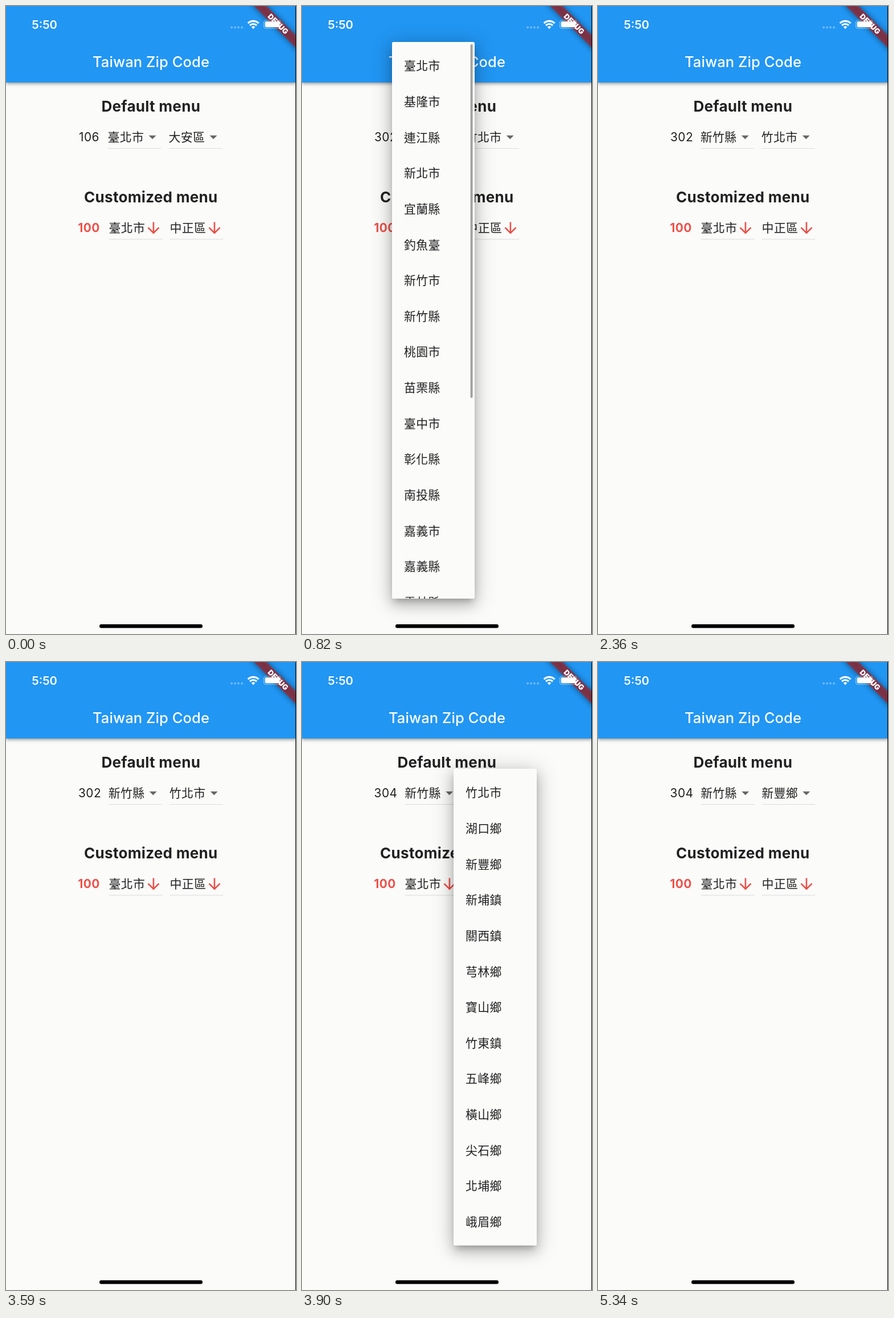
Animation of 509 by 1100 pixels, one loop 6260 ms. Source, as an HTML page:

```html
<!DOCTYPE html>
<html lang="zh-Hant">
<head>
<meta charset="utf-8">
<title>Taiwan Zip Code</title>
<style>
  html, body { margin: 0; width: 100%; height: 100%; overflow: hidden; background: #fbfbfa; }
  #stage { position: relative; width: 509px; height: 1100px; overflow: hidden; background: #fbfbfa; }
  #bar {
    position: absolute; left: 0; top: 0; width: 509px; height: 134px; background: #2196f3;
    box-shadow: 0 2px 5px rgba(0,0,0,.32), 0 1px 9px rgba(0,0,0,.16);
  }
  svg { position: absolute; left: 0; top: 0; overflow: visible; }
  text { font-family: Inter, "Open Sans", sans-serif; font-optical-sizing: none; fill: #212121; white-space: pre; }
  .mid { text-anchor: middle; }
  .title { font-size: 25.5px; font-weight: 500; letter-spacing: .1px; fill: #fff; }
  .head { font-size: 26px; font-weight: 700; letter-spacing: .3px; }
  .zip { font-size: 20.8px; letter-spacing: .5px; }
  .cjk { font-family: "Noto Sans CJK TC", "Noto Sans CJK JP", "Noto Sans CJK", sans-serif; font-size: 20.9px; letter-spacing: .3px; }
  .red { fill: #eb5149; }
  .line { fill: #dcdcdc; }
  .menu, .panel, .list { position: absolute; }
  .panel {
    left: 0; width: 100%; border-radius: 2.6px; background: #fbfbfa;
    box-shadow: 0 6.5px 10px -4px rgba(0,0,0,.2), 0 10.4px 20px 1.3px rgba(0,0,0,.15), 0 5px 36px 4px rgba(0,0,0,.19);
  }
  .list { inset: 0; overflow: hidden; border-radius: 2.6px; }
</style>
</head>
<body>
<div id="stage">
  <div id="bar"></div>
  <svg width="509" height="1100">
    <text class="mid title" x="254.5" y="106.6">Taiwan Zip Code</text>
    <text class="mid head" x="254.3" y="185">Default menu</text>
    <text class="mid head" x="254.3" y="344">Customized menu</text>
    <g id="rows"></g>
  </svg>
  <div id="menus"></div>
  <svg width="509" height="1100">
    <defs>
      <filter id="soft" x="-30%" y="-150%" width="160%" height="400%"><feGaussianBlur stdDeviation="5.2"/></filter>
    </defs>
    <g transform="translate(509 0) rotate(45)">
      <rect x="-60" y="36.5" width="120" height="15.7" opacity=".5" filter="url(#soft)"/>
      <rect x="-60" y="36.5" width="120" height="15.7" fill="#b71c1c" fill-opacity=".627"/>
      <text class="mid" x="0" y="49" style="font-size:12.8px;font-weight:900;fill:#fff">DEBUG</text>
    </g>
    <text x="45.3" y="40" style="font-size:20.3px;font-weight:600;fill:#fff">5:50</text>
    <g fill="#fff">
      <g opacity=".35">
        <circle cx="396" cy="37.5" r="1.9"/><circle cx="402" cy="37.5" r="1.9"/>
        <circle cx="408" cy="37.5" r="1.9"/><circle cx="414" cy="37.5" r="1.9"/>
      </g>
      <g fill="none" stroke="#fff" stroke-width="3.2">
        <path d="M424.6 30.2a13.4 13.4 0 0 1 18.8 0"/>
        <path d="M428 34a8.5 8.5 0 0 1 12 0"/>
      </g>
      <path d="M434 40.2l-3.3-3.4a4.8 4.8 0 0 1 6.6 0z"/>
      <rect x="452.5" y="24.8" width="30" height="14.6" rx="4.2" fill="none" stroke="#fff" stroke-opacity=".4" stroke-width="1.3"/>
      <rect x="454.6" y="26.9" width="25.8" height="10.4" rx="2.4"/>
      <path d="M484.5 29.8q2 .7 2 2.4t-2 2.4z" opacity=".4"/>
    </g>
    <rect x="164" y="1083" width="181" height="6.6" rx="3.3"/>
    <rect x="508" y="0" width="1" height="1100"/>
  </svg>
</div>
<script>
const LOOP = 6260, ITEM = 62.64, PAD = 10.44;
const STEPS = [0, 110, 210, 310];
const $ = id => document.getElementById(id);
const clamp = v => Math.max(0, Math.min(1, v));

const values = [
  { from: 0, zip: '106', zipX: 128, x: 178.6, city: '臺北市', area: '大安區' },
  { from: 820, zip: '302', zipX: 127, x: 179.8, city: '新竹縣', area: '竹北市' },
  { from: 3900, zip: '304', zipX: 126.6, x: 180.3, city: '新竹縣', area: '新豐鄉' }
];

const menus = [
  {
    open: 510, close: 2050, x: 157.7, y: 62.5, w: 145.8, h: 975, total: 24, ink: 7, bar: true,
    names: '臺北市 基隆市 連江縣 新北市 宜蘭縣 釣魚臺 新竹市 新竹縣 桃園市 苗栗縣 臺中市 彰化縣 南投縣 嘉義市 嘉義縣 雲林縣'
  },
  {
    open: 3590, close: 5030, x: 265.8, y: 187, w: 145.8, h: 835.2, total: 13, ink: 2,
    names: '竹北市 湖口鄉 新豐鄉 新埔鎮 關西鎮 芎林鄉 寶山鄉 竹東鎮 五峰鄉 橫山鄉 尖石鄉 北埔鄉 峨眉鄉'
  }
];

const triangle = (x, y) => `<path d="M${x - 6.5} ${y - 3.2}h13l-6.5 6.5z" fill="#666"/>`;
const arrow = (x, y) => `<path class="red" transform="translate(${x - 15.66} ${y - 15.66}) scale(1.305)"
  d="M20 12l-1.41-1.41L13 16.17V4h-2v12.17l-5.58-5.59L4 12l8 8 8-8z"/>`;

function field(x, y, name, icon) {
  return `<text class="cjk" x="${x}" y="${y + 6.9}">${name}</text>
    <rect class="line" x="${x + .4}" y="${y + 19}" width="93.5" height="1"/>${icon(x + 78.4, y)}`;
}

function row(v, y, icon, zipStyle = '') {
  return `<text class="zip" ${zipStyle} x="${v.zipX}" y="${y + 7.4}">${v.zip}</text>`
    + field(v.x, y, v.city, icon) + field(v.x + 107, y, v.area, icon);
}

const custom = { zip: '100', zipX: 126.2, x: 180.5, city: '臺北市', area: '中正區' };
$('rows').innerHTML = values.map(v => `<g class="value">${row(v, 230, triangle)}</g>`).join('')
  + row(custom, 389, arrow, 'style="font-weight:700;fill:#eb5149"');

$('menus').innerHTML = menus.map((m, k) => {
  const items = m.names.split(' ').map((name, i) =>
    `<text class="cjk item" x="21" y="${PAD + ITEM * (i + .5) + 7.6}">${name}</text>`).join('');
  const inkTop = PAD + ITEM * m.ink;
  return `<div class="menu" style="left:${m.x}px;top:${m.y}px;width:${m.w}px;height:${m.h}px">
    <div class="panel"></div>
    <div class="list"><svg width="${m.w}" height="${m.h}">
      <clipPath id="row${k}"><rect y="${inkTop}" width="${m.w}" height="${ITEM}"/></clipPath>
      <circle class="ink" clip-path="url(#row${k})" cx="74.2" cy="${inkTop + 37}" r="43" fill-opacity=".075"/>
      ${items}
      ${m.bar ? '<rect class="thumb" x="137.6" y="4" width="4" height="619.5" rx="2" fill-opacity=".36"/>' : ''}
    </svg></div></div>`;
}).join('');

const valueNodes = [...document.querySelectorAll('.value')];
document.querySelectorAll('.menu').forEach((node, k) => {
  const m = menus[k];
  m.node = node;
  m.panel = node.querySelector('.panel');
  m.inkNode = node.querySelector('.ink');
  m.thumb = node.querySelector('.thumb');
  m.items = [...node.querySelectorAll('.item')];
});

function drawMenu(m, t) {
  const closing = t >= m.close;
  const step = STEPS.filter(s => t - m.open >= s).length - 1;
  const p = Math.max(0, step) / 3;
  const alpha = closing ? (t < m.close + 110 ? .56 : 0) : clamp(p / .25);
  m.node.style.opacity = alpha;
  m.node.style.visibility = alpha ? 'visible' : 'hidden';

  // The panel unrolls from the first item, then the items fade in one by one.
  const grow = clamp((p - .25) / .25);
  const top = PAD * (1 - grow);
  const bottom = PAD + ITEM + (m.h - PAD - ITEM) * grow;
  m.panel.style.top = top + 'px';
  m.panel.style.height = bottom - top + 'px';
  const unit = .5 / (m.total + 1.5);
  m.items.forEach((item, i) => {
    item.style.opacity = i ? clamp((p - .5 - i * unit) / (1.5 * unit)) : 1;
  });
  m.inkNode.style.opacity = closing ? 1 : 0;
  if (m.thumb) m.thumb.style.opacity = p > .5 ? 1 : 0;
}

function draw(now) {
  const t = now % LOOP;
  const current = values.filter(v => t >= v.from).length - 1;
  valueNodes.forEach((g, i) => g.style.display = i === current ? '' : 'none');
  menus.forEach(m => drawMenu(m, t));
}

const start = performance.now();
function tick() {
  draw(performance.now() - start);
  requestAnimationFrame(tick);
}
tick();
</script>
</body>
</html>
```
